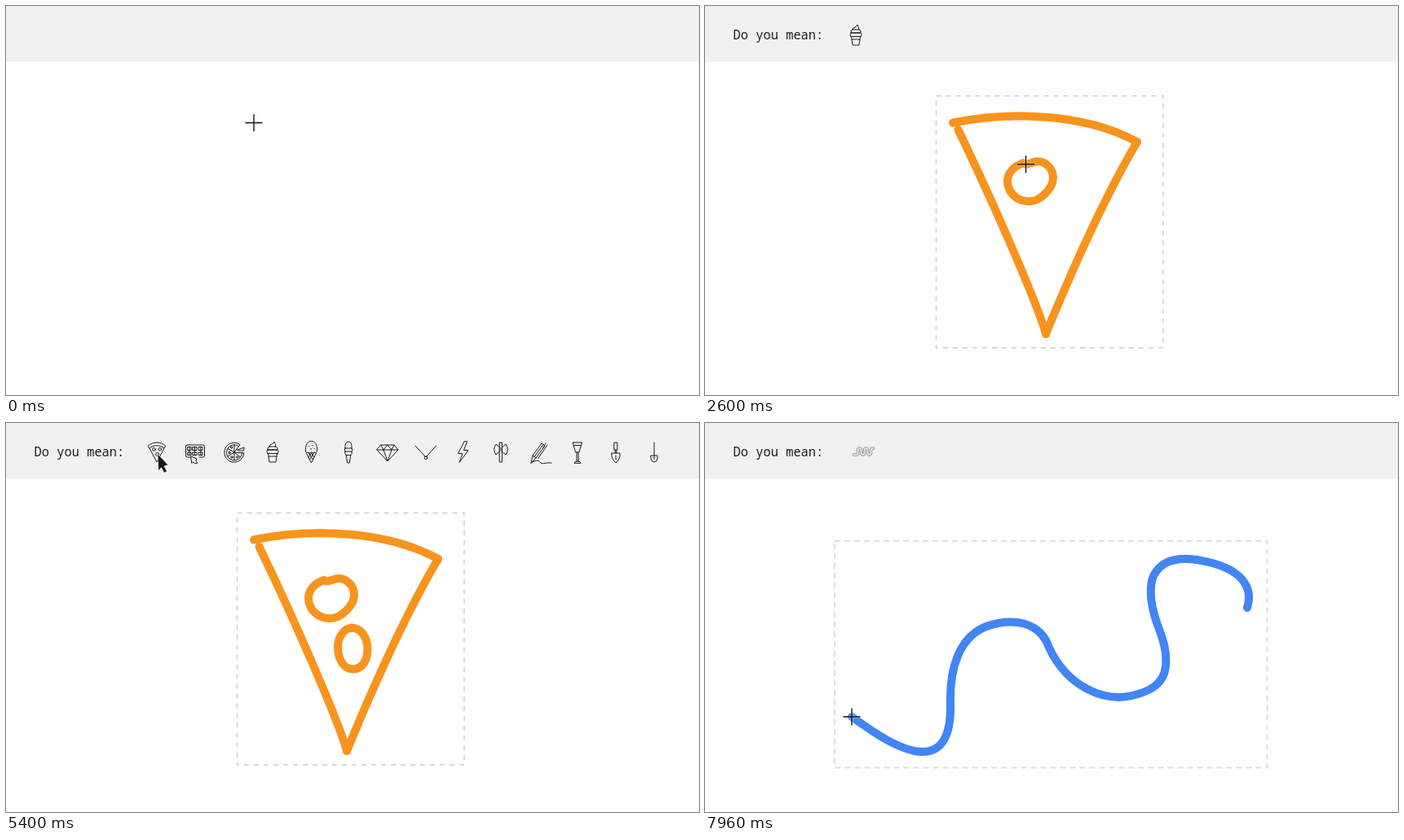
An HTML page for the animation above (8000 ms loop, 850 by 478 pixels).

```html
<!DOCTYPE html>
<html lang="en">
<head>
<meta charset="utf-8">
<title>Sketch suggestions</title>
<style>
  html, body { margin: 0; width: 100%; height: 100%; overflow: hidden; background: #fff; }
  svg { display: block; width: 100%; height: 100%; }
  text { font: 15.4px 'Roboto Mono', 'Noto Sans Mono', 'DejaVu Sans Mono', monospace; fill: #1d1d1d; }
  .icon { fill: none; stroke: #1a1a1a; stroke-width: 1; stroke-linejoin: round; stroke-linecap: round; }
  .stroke { fill: none; stroke-width: 10; stroke-linecap: round; stroke-linejoin: round; }
</style>
</head>
<body>
<svg viewBox="0 0 850 478" xmlns="http://www.w3.org/2000/svg">
  <rect width="850" height="478" fill="#fff"/>
  <rect width="850" height="68.5" fill="#f1f1f1"/>
  <rect id="hover" x="163" y="13" width="45" height="45" rx="2" fill="#e0e0e0"/>
  <text id="label" x="34.5" y="40.5">Do you mean:</text>
  <g id="lists"></g>
  <rect id="boxA" x="283.5" y="110.5" width="278.5" height="309.5" fill="none" stroke="#cbcbcb" stroke-width="1.4" stroke-dasharray="6 6"/>
  <rect id="boxB" x="159" y="145" width="530.5" height="278.5" fill="none" stroke="#dedede" stroke-width="2" stroke-dasharray="7 5"/>
  <g id="ink"></g>
  <g id="art"></g>
  <g id="cross" fill="none">
    <path d="M-10.5 0H10.5M0 -10.5V10.5" stroke="#fff" stroke-width="3.6" opacity=".35"/>
    <path d="M-10.5 0H10.5M0 -10.5V10.5" stroke="#111" stroke-width="1.4"/>
  </g>
  <path id="arrow" d="M0 0L1 20.5L4.6 16.8L8 23.2L11.4 21.4L8 15L12.8 13.6Z" fill="#151515" stroke="#fff" stroke-width=".6"/>
</svg>
<script>
const $ = id => document.getElementById(id);
const NS = 'http://www.w3.org/2000/svg';
const LOOP = 8000;
const ORANGE = '#f7941f', BLUE = '#4285f4';

const clamp = v => Math.max(0, Math.min(1, v));
const ramp = (t, a, b) => clamp((t - a) / (b - a));
const sine = p => 0.5 - 0.5 * Math.cos(Math.PI * p);
const linear = p => p;

// Icons are drawn around their own centre.
const line = d => `<path d="${d}"/>`;
const ring = (x, y, r) => `<circle cx="${x}" cy="${y}" r="${r}"/>`;
const icons = {
  slice: line('M-10.7 -8C-5 -13.4 5 -13.4 10.7 -8L9 -5C4 -9.4 -4 -9.4 -9 -5ZM-9 -5L0 12L9 -5')
    + ring(-3.6, -3.6, 1.9) + ring(3.8, -3.8, 1.8) + ring(0.6, 2.4, 2),
  tray: line('M-9.5 -9H9.5Q11.5 -9 11.5 -7V4Q11.5 6 9.5 6H5M-6 6H-9.5Q-11.5 6 -11.5 4V-7Q-11.5 -9 -9.5 -9')
    + line('M-9 -6.5H-5V-2.5H-9ZM-3 -6.5H2V-2.5H-3ZM4.5 -6.5H9V-2.5H4.5ZM-9 0H-5V3.5H-9ZM-3 0H2V3.5H-3ZM4.5 0H9V3.5H4.5ZM-7 -6V3M6.8 -6V3M-0.5 -6V3')
    + line('M-5 5L2 8L1 11L3 13L0 14L-2 12L-4 13Z'),
  pie: line('M11.8 1A12 12 0 1 1 7 -9.4L0 0ZM9.6 1A9.6 9.6 0 1 1 5.5 -7.5')
    + line('M0 0V-9.6M0 0L-8.4 -4.6M0 0L-8.2 5M0 0V9.6M0 0L7.4 6M4 -3L12 -6L11.5 -2L5 -2Z')
    + ring(-3.5, -6, 1.2) + ring(-6, 0.5, 1.2) + ring(-3, 6, 1.2) + ring(3.6, 6, 1.1),
  soft: line('M-4 -7Q-4 -10 -0.5 -10L2 -13Q4.6 -8.5 3.5 -7M-4 -7H4Q6.5 -7 6 -3H-6Q-6.5 -7 -4 -7ZM-6 -3H6Q8 -2 6.5 1.5H-6.5Q-8 -2 -6 -3ZM-5.5 1.5L-4 12H4L5.5 1.5M-5 5H5'),
  cone: line('M-7 -1C-9 -18 9 -18 7 -1Q5 2 3.5 0Q1.7 2 0 0Q-1.7 2 -3.5 0Q-5 2 -7 -1ZM-6 1L0 13L6 1M-3 1L2 9M3 1L-2 9M0 1L3.2 6M0 1L-3.2 6')
    + line('M-3 -7L-2 -8M1 -9L2 -8M-1 -4H0M3 -5L4 -4'),
  pop: line('M-4 -5Q-4.5 -13 0 -13Q4.5 -13 4 -5Q5.6 -2.5 4 -1Q5 2 3 3.5H-3Q-5 2 -4 -1Q-5.6 -2.5 -4 -5ZM-4 -5H4M-4 -1H4M-2.8 3.5L-1.3 13H1.3L2.8 3.5'),
  gem: line('M-8 -9H8L13 -3L0 11L-13 -3ZM-13 -3H13M-8 -9L-5 -3L0 11L5 -3L8 -9M-5 -3L0 -9L5 -3'),
  chain: line('M-13 -8L-1 5Q0 6 1 5L12.5 -8') + ring(0, 6.8, 1.8),
  bolt: line('M1 -13L-6.5 1.5H-1L-5 12.5L6 -2.5H0.5L4.5 -13Z'),
  axe: line('M-1.4 -12H1.4V12H-1.4ZM-1.4 -6L-6 -10Q-10.5 -3.5 -6 3L-1.4 -1ZM1.4 -6L6 -10Q10.5 -3.5 6 3L1.4 -1Z'),
  pencil: line('M-12 13L-10 4L1 -11L5 -8L-6 7ZM-10 4L-6 7M-8 5.5L3 -9.5M3 -6L6 -11M8 -9L-3 7M-12 13C-4 8 -2 11 0 13S8 12 13 13'),
  flute: line('M-5.5 -12H5.5L2 0H-2ZM-4.6 -8.5H4.6M-1 0V11M1 0V11M-4 13Q-4 11 0 11Q4 11 4 13Z'),
  trowel: line('M-1.8 -12H1.8V-3H-1.8ZM-0.8 -3V1M0.8 -3V1M-5 1H5V5Q4 10 0 13Q-4 10 -5 5ZM0 4V9'),
  spade: line('M0 -12V8M-4 4H4V8Q4 11 0 12Q-4 11 -4 8Z'),
};
const names = Object.keys(icons);
const slots = [185, 232, 280, 327, 374.5, 420, 468, 515, 561, 607, 656, 701, 748, 795];

// Each list pops in icon by icon, then leaves as a whole.
const lists = [
  { start: 1572, end: 2560, order: [6, 7, 8, 4, 3, 5, 9, 11, 0, 12, 13, 2, 1, 10] },
  { start: 2590, end: 3800, order: [3, 4, 5, 0, 6, 2, 7, 11, 8, 9, 10, 1, 12, 13] },
  { start: 3847, end: 6160, order: names.map((_, i) => i) },
];
const STEP = 36;

function group(parent, html, attrs) {
  const g = document.createElementNS(NS, 'g');
  for (const k in attrs) g.setAttribute(k, attrs[k]);
  g.innerHTML = html;
  parent.appendChild(g);
  return g;
}

for (const list of lists) {
  list.node = group($('lists'), '', { class: 'icon' });
  list.items = list.order.map((n, i) =>
    group(list.node, icons[names[n]], { transform: `translate(${slots[i]} 36)` }));
}
const wave = 'M-12 4H-9Q-7 4 -7 1V-1Q-7 -4 -5 -4T-3 -1V1Q-3 4 -1 4T1 1V-1Q1 -4 3 -4T5 -1V1Q5 4 7 4T9 1V-1Q9 -4 12 -4';
const squiggle = group($('lists'),
  `<path d="${wave}" stroke="#333" stroke-width="3.6"/><path d="${wave}" stroke="#f1f1f1" stroke-width="1.6"/>`,
  { class: 'icon', transform: 'translate(194.5 35)' });

group($('art'), icons.slice,
  { class: 'icon', transform: 'translate(423 268) scale(12.4)', style: `stroke:${ORANGE};stroke-width:.82` });

// Pen strokes; the ink trails the pen by "lag" ms.
const strokes = [
  { d: 'M304 143.5C380 128 470 134 530 167', from: 340, to: 760 },
  { d: 'M530 167C490 235 450 325 418 403', from: 760, to: 1190 },
  { d: 'M418 403C408 366 352 238 310.5 152', from: 1190, to: 1480 },
  { d: 'M390 193C378 197 371 206 371 215C371 230 384 241 399 240C409 240 427 226 427 211C427 200 418 191 408 191C402 191 397 195 393.5 194.5', from: 2200, to: 2540 },
  { d: 'M424 252C414 252 407 264 407 275C407 290 414 302.5 426 302.5C437 302.5 443.5 291 443.5 278C443.5 264 436 252 423.5 251.5', from: 3280, to: 3740 },
  { d: 'M665 227C672 205 662 183 622 172C585 162 560 167 550 188C543 206 548 228 555 248C562 266 567 282 565 299C563 321 545 330 524 335C490 343 445 325 422 276C411 243 376 239 345 250C312 263 300 300 301 345C302 385 290 404 267 404C240 404 205 379 180 361',
    from: 6790, to: 7685, color: BLUE, ease: linear, lag: 21 },
];
for (const s of strokes) {
  const p = document.createElementNS(NS, 'path');
  p.setAttribute('d', s.d);
  p.setAttribute('class', 'stroke');
  p.setAttribute('stroke', s.color || ORANGE);
  $('ink').appendChild(p);
  s.node = p;
  s.len = p.getTotalLength();
  s.at = t => (s.ease || sine)(ramp(t, s.from, s.to));
}

// Free cursor moves between strokes.
const moves = [
  { from: 2040, to: 2200, a: [310.5, 152], b: [390, 193] },
  { from: 3070, to: 3280, a: [393.5, 194.5], b: [424, 252] },
  { from: 4540, to: 5380, a: [423.5, 251.5], b: [186, 38] },
  { from: 6000, to: 6440, a: [186, 38], b: [665, 227] },
];
const path = [...strokes, ...moves].sort((a, b) => a.from - b.from);

function cursor(t) {
  let cur = path[0];
  for (const p of path) if (p.from <= t) cur = p;
  if (cur.node) {
    const pt = cur.node.getPointAtLength(cur.len * cur.at(t));
    return [pt.x, pt.y];
  }
  const k = sine(ramp(t, cur.from, cur.to));
  return cur.a.map((v, i) => v + (cur.b[i] - v) * k);
}

const fade = (node, v) => {
  node.style.opacity = v;
  node.style.display = v > 0 ? '' : 'none';
};

function draw(t) {
  const swap = ramp(t, 5420, 5550);
  const clear = 1 - ramp(t, 6000, 6160);

  for (const s of strokes) {
    const p = s.at(t - (s.lag || 0));
    s.node.style.strokeDasharray = p < 1 ? `${s.len * p} ${s.len + 20}` : 'none';
    fade(s.node, p > 0 ? (s.color ? 1 : 1 - swap) : 0);
  }
  fade($('boxA'), ramp(t, 1440, 1500) * (1 - swap));
  fade($('boxB'), ramp(t, 7780, 7920));
  fade($('art'), swap * clear);
  fade($('hover'), swap * clear);
  fade($('label'), t < 7000 ? ramp(t, 1545, 1560) * clear : ramp(t, 7880, 7940));

  for (const l of lists) {
    fade(l.node, t >= l.start && t < l.end ? clear : 0);
    l.items.forEach((g, i) => fade(g, ramp(t, l.start + i * STEP, l.start + i * STEP + 8)));
  }
  fade(squiggle, ramp(t, 7925, 8000));

  const [x, y] = cursor(t);
  const pointing = y < 68;
  $('cross').setAttribute('transform', `translate(${x} ${y})`);
  $('arrow').setAttribute('transform', `translate(${x} ${y})`);
  fade($('cross'), pointing ? 0 : 1);
  fade($('arrow'), pointing ? 1 : 0);
}

let t0;
function tick(now) {
  if (t0 === undefined) t0 = now;
  draw((now - t0) % LOOP);
  requestAnimationFrame(tick);
}
draw(0);
requestAnimationFrame(tick);
</script>
</body>
</html>
```
